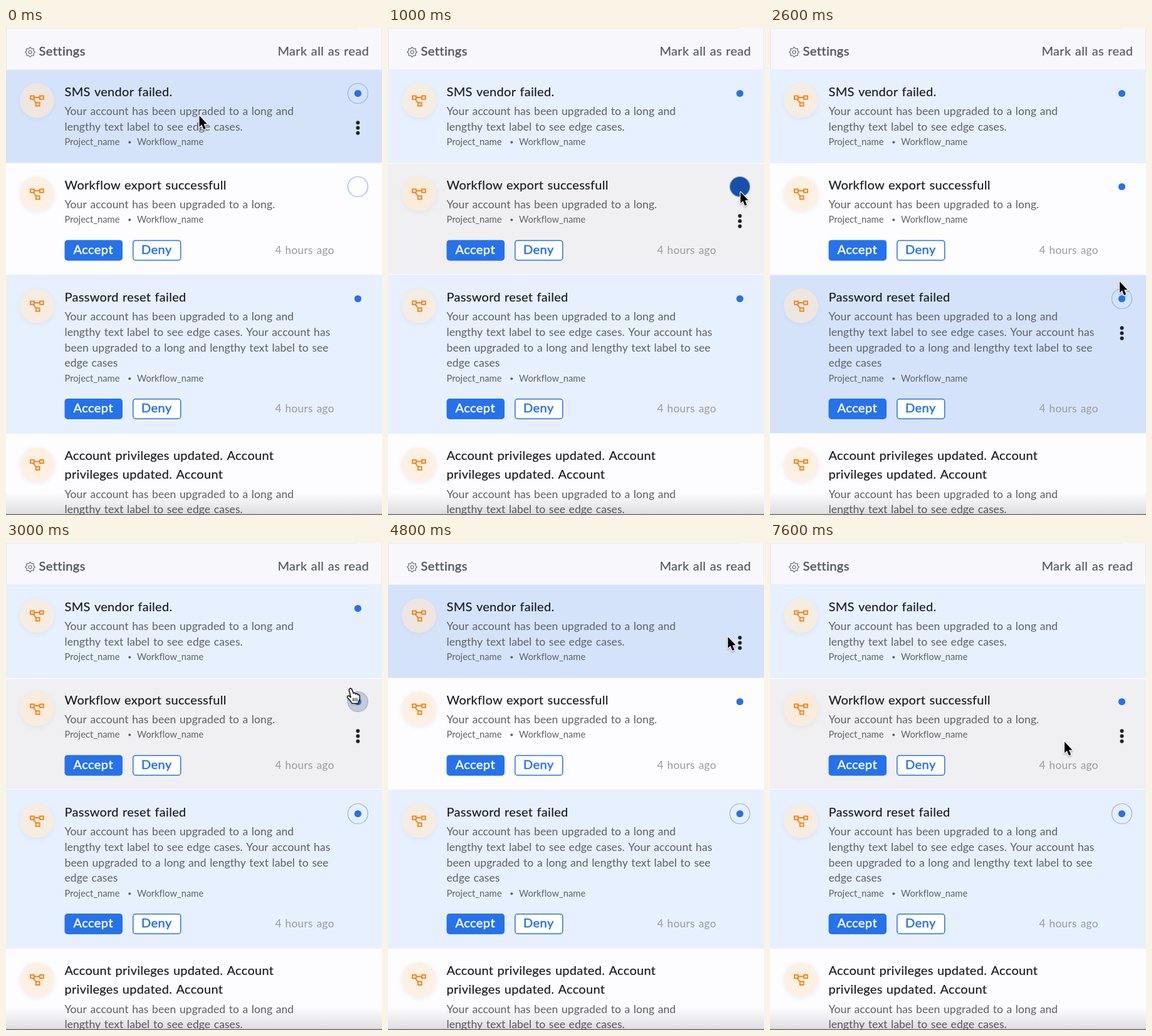
These frames come from a looping animation (600x778 px, 7.7 s). An HTML page with a canvas:

```html
<!DOCTYPE html>
<html lang="en">
<head>
<meta charset="utf-8">
<title>Notifications</title>
<style>
html, body { margin: 0; width: 100%; height: 100%; overflow: hidden; background: #fdfcff; }
canvas { display: block; width: 600px; height: 778px; }
</style>
</head>
<body>
<canvas id="stage" width="600" height="778"></canvas>
<script>
const ctx = document.getElementById('stage').getContext('2d');
const LOOP = 7700, STEP = 100;
const BLUE = '#2672ea', DOT_X = 561.5;

// size, letter spacing, word spacing, colour, extra stroke
const STYLES = {
  title:  [20, .3, .8, '#16191e', .15],
  body:   [17.5, .08, 1, '#5d6066', 0],
  meta:   [14.7, .02, 0, '#5f6267', 0],
  ago:    [17.2, .35, 1, '#999a9e', 0],
  head:   [20, .32, 1, '#555960', .2],
  strong: [20, .45, 1, '#555960', .5],
  accept: [20, .45, 0, '#ffffff', .5],
  deny:   [20, .45, 0, BLUE, .5]
};

const ROWS = [
  { y: 66, h: 150, icon: 116, dot: 104.5, unread: true, title: ['SMS vendor failed.'],
    body: ['Your account has been upgraded to a long and',
           'lengthy text label to see edge cases.'], meta: 187 },
  { y: 216, h: 178, icon: 265, dot: 253.5, title: ['Workflow export successfull'],
    body: ['Your account has been upgraded to a long.'], meta: 311, buttons: 338.7 },
  { y: 394, h: 254, icon: 444, dot: 432.5, unread: true, title: ['Password reset failed'],
    body: ['Your account has been upgraded to a long and',
           'lengthy text label to see edge cases. Your account has',
           'been upgraded to a long and lengthy text label to see',
           'edge cases'], meta: 564.7, buttons: 592 },
  { y: 648, h: 130, icon: 697.5, title: ['Account privileges updated. Account',
           'privileges updated. Account'],
    body: ['Your account has been upgraded to a long and',
           'lengthy text label to see edge cases.'] }
];

// time, x, y of the pointer tip
const PATH = [
  [0, 308, 140], [400, 415, 180], [700, 535, 238], [900, 562, 262], [1300, 562, 262],
  [1600, 558, 385], [1700, 553, 424], [1900, 559, 430], [2500, 559, 430], [2700, 556, 380],
  [3000, 551, 232], [3200, 552, 232], [3400, 555, 200], [3700, 560, 106], [4300, 560, 106],
  [4800, 542, 150], [4900, 525, 190], [5000, 505, 235], [5100, 488, 262], [5200, 488, 262],
  [5400, 493, 271], [5800, 493, 271], [6300, 469.5, 317.5], [LOOP, 469.5, 317.5]
];
const CLICKS = [[900, 1], [1900, 2], [2300, 2], [3900, 0]];

const ARROW = new Path2D('M.5 0V18L4.4 14.3L7.5 22L10.7 20.6L7.6 13.2H13Z');
const HAND = new Path2D('M-3.4 2.4Q-2 -1.2 .6 1.4L3.2 8.4Q4.6 6.6 6.2 8.2L6.9 9.6' +
  'Q8.4 7.8 9.9 9.4L10.3 10.8Q12.4 9.4 13.3 12.2V16.6Q12.8 19.6 11.2 21.4V24H1.2' +
  'Q-1 19.2 -5.8 15.4Q-7.4 12 -3.8 12.4L-.6 14.8Z');

function rect(x, y, w, h, color) {
  ctx.fillStyle = color;
  ctx.fillRect(x, y, w, h);
}

function disc(x, y, r, fill, stroke, width = 1.2) {
  ctx.beginPath();
  ctx.arc(x, y, r, 0, Math.PI * 2);
  if (fill) { ctx.fillStyle = fill; ctx.fill(); }
  if (stroke) { ctx.strokeStyle = stroke; ctx.lineWidth = width; ctx.stroke(); }
}

function text(str, x, y, style) {
  const [size, letter, word, color, weight] = STYLES[style];
  ctx.font = `${size}px Lato, "Open Sans", sans-serif`;
  ctx.letterSpacing = letter + 'px';
  ctx.wordSpacing = word + 'px';
  ctx.fillStyle = ctx.strokeStyle = color;
  ctx.fillText(str, x, y);
  if (weight) { ctx.lineWidth = weight; ctx.strokeText(str, x, y); }
}

function button(x, y, w, label, filled) {
  ctx.beginPath();
  ctx.roundRect(x + .75, y + .75, w - 1.5, 31.5, 4);
  ctx.fillStyle = filled ? BLUE : '#fff';
  ctx.fill();
  ctx.strokeStyle = BLUE;
  ctx.lineWidth = 1.5;
  ctx.stroke();
  text(label, x + 14, y + 22.3, filled ? 'accept' : 'deny');
}

function gear(x, y) {
  ctx.beginPath();
  for (let i = 0; i < 32; i++) {
    const a = (i - .5) * Math.PI / 16, r = i % 4 < 2 ? 7.6 : 6;
    ctx.lineTo(x + r * Math.cos(a), y + r * Math.sin(a));
  }
  ctx.closePath();
  ctx.strokeStyle = '#686c73';
  ctx.lineWidth = 1.2;
  ctx.stroke();
  disc(x, y, 2.5, null, '#686c73');
}

function flowIcon(y, back) {
  ctx.save();
  ctx.shadowColor = 'rgba(120,130,170,.13)';
  ctx.shadowBlur = 7;
  ctx.shadowOffsetY = 2;
  disc(49.5, y, 27.5, back);
  ctx.restore();
  disc(49.5, y, 27.5, 'rgba(255,234,208,.6)');
  ctx.strokeStyle = '#f58112';
  ctx.lineWidth = 1.9;
  for (const [x, dy] of [[39, -7.5], [54, -7.5], [47.8, 3.3]]) ctx.strokeRect(x, y + dy, 5.8, 5.2);
  ctx.beginPath();
  ctx.moveTo(45, y - 5);
  ctx.lineTo(54, y - 5);
  ctx.moveTo(43.5, y - 2);
  ctx.lineTo(48, y + 3.5);
  ctx.stroke();
}

function pointerAt(t) {
  const i = PATH.findIndex(p => p[0] > t);
  const [t0, x0, y0] = PATH[i - 1], [t1, x1, y1] = PATH[i];
  const k = (t - t0) / (t1 - t0);
  return { x: x0 + (x1 - x0) * k, y: y0 + (y1 - y0) * k };
}

function marker(i, t, over) {
  const y = ROWS[i].dot;
  const pressed = CLICKS.some(([at, row]) => row === i && t === at + STEP);
  const lit = [t < 4100, t >= 1100, t < 2100 || t >= 2500][i];
  const ring = [t < 600, t < 1100, t >= 2000][i];
  if (pressed) return disc(DOT_X, y, 16, '#1650ab', '#7ca6ee');
  if (over) disc(DOT_X, y, 16, 'rgba(165,172,187,.55)', '#8fb2f1');
  else if (ring) disc(DOT_X, y, 16, null, '#8fb2f1');
  if (lit) disc(DOT_X, y, 5.6, BLUE);
}

function drawRow(row, i, t, hover, over) {
  const base = row.unread ? '#e7f0fe' : '#fdfcff';
  const active = row.unread ? '#d5e3fa' : '#f0f0f2';
  rect(0, row.y, 600, row.h, base);
  if (hover) rect(0, row.y + 1, 600, row.h - 2, active);
  flowIcon(row.icon, hover ? active : base);
  let y = row.icon - 7;
  row.title.forEach((line, n) => text(line, 93.5, y - .5 + n * 30, 'title'));
  y += row.title.length * 30;
  row.body.forEach((line, n) => text(line, 93.5, y + n * 24.8, 'body'));
  if (row.meta) {
    text('Project_name', 93.5, row.meta, 'meta');
    disc(197.3, row.meta - 4.5, 2, '#5f6267');
    text('Workflow_name', 209, row.meta, 'meta');
  }
  if (row.buttons) {
    button(93.5, row.buttons, 92.5, 'Accept', true);
    button(202, row.buttons, 77.5, 'Deny', false);
    text('4 hours ago', 429.5, row.buttons + 22, 'ago');
  }
  if (!row.dot) return;
  if (hover) for (const d of [46.8, 55, 63.2]) disc(DOT_X, row.dot + d, 3, '#20242b');
  marker(i, t, over);
}

function drawPointer(p, hand) {
  ctx.save();
  ctx.translate(p.x, p.y);
  ctx.lineJoin = 'round';
  ctx.shadowColor = 'rgba(0,0,0,.3)';
  ctx.shadowBlur = 3;
  ctx.shadowOffsetY = 1.5;
  const shape = hand ? HAND : ARROW;
  ctx.strokeStyle = hand ? '#111' : '#fff';
  ctx.lineWidth = hand ? 1.6 : 2.4;
  ctx.stroke(shape);
  ctx.shadowColor = 'transparent';
  ctx.fillStyle = hand ? '#fff' : '#000';
  ctx.fill(shape);
  if (hand) {
    ctx.lineWidth = 1.2;
    ctx.stroke(shape);
    ctx.beginPath();
    for (const x of [3, 6, 9]) { ctx.moveTo(x, 15.5); ctx.lineTo(x, 21); }
    ctx.stroke();
  }
  ctx.restore();
}

function drawHeader() {
  rect(0, 0, 600, 66, '#f8f8fc');
  rect(0, 0, 562, 1, '#ebebf0');
  rect(0, 0, 1, 66, '#e3e4ea');
  rect(599, 0, 1, 66, '#e9eaf0');
  gear(38.5, 38.5);
  text('Settings', 52.5, 44.3, 'strong');
  text('Mark all as read', 433.5, 44.3, 'head');
}

function drawFooter() {
  const shade = ctx.createLinearGradient(0, 742, 0, 777);
  shade.addColorStop(0, 'rgba(0,0,0,0)');
  shade.addColorStop(1, 'rgba(0,0,0,.12)');
  rect(0, 742, 600, 36, shade);
  rect(0, 776.7, 600, 1.3, '#606064');
}

function draw(t) {
  const p = pointerAt(t);
  const hovered = ROWS.findIndex(r => p.y >= r.y && p.y < r.y + r.h);
  const near = Math.hypot(p.x - DOT_X, p.y - ROWS[hovered].dot) < 25;
  const hand = near && t >= 1100;
  drawHeader();
  ROWS.forEach((row, i) => drawRow(row, i, t, i === hovered, hand && i === hovered));
  drawFooter();
  if (CLICKS.some(c => c[0] === t)) disc(p.x, p.y, 42, null, '#0c0f16', 2);
  drawPointer(p, hand);
}

function tick() {
  const t = performance.now() % LOOP;
  draw(Math.floor(t / STEP) * STEP);
  requestAnimationFrame(tick);
}
tick();
</script>
</body>
</html>
```
